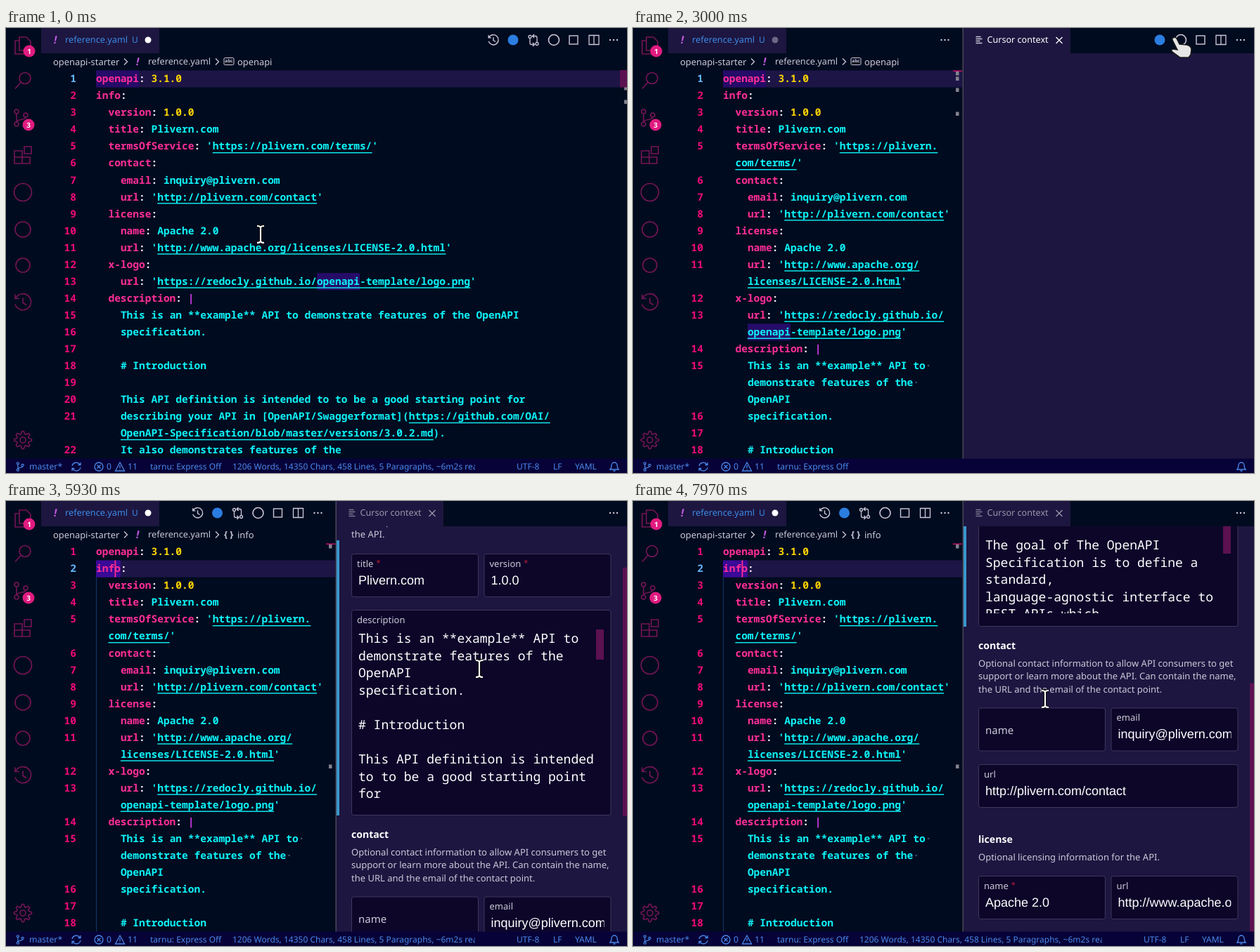
These frames come from a looping animation (883x634 px, 8 s). An HTML page:

```html
<!DOCTYPE html>
<html lang="en">
<head>
<meta charset="utf-8">
<title>Editor with cursor context</title>
<style>
html, body { margin: 0; width: 100%; height: 100%; overflow: hidden; background: #010b1f; }
svg { position: fixed; inset: 0; width: 100%; height: 100%; }
text { white-space: pre; text-rendering: geometricPrecision; font-family: "Noto Sans", "Open Sans", sans-serif; }
.code { font: bold 14.54px "Noto Sans Mono", "DejaVu Sans Mono", monospace; }
.area { font: 18px "Noto Sans Mono", "DejaVu Sans Mono", monospace; }
.arial { font-family: "Liberation Sans", Arial, sans-serif; }
.num { fill: #ee0a78; text-anchor: end; }
.num.on { fill: #62b4fb; }
.key { fill: #ff2e97; }
.punc { fill: #f4eef8; }
.str { fill: #0ef3f8; }
.val { fill: #ffd400; }
.pipe { fill: #d43df0; }
.word { fill: var(--word); }
</style>
</head>
<body>
<svg id="stage" viewBox="0 0 883 634" xmlns="http://www.w3.org/2000/svg"></svg>
<script>
(() => {
const LOOP = 8000, X = 128, CW = 8.725, LH = 24.05;
const NAVY = '#010b1f', PANEL = '#1d1640', FIELD = '#0d0629', EDGE = '#3d375c';
const CYAN = '#0ef3f8', SOFT = '#cbc8d8', DIM = '#751557', SLIDER = '#5c1150', BLUE = '#4b88ea';

// Drawing helpers; text is placed by its visual middle.
const rect = (x, y, w, h, fill, more = '') =>
  `<rect x="${x}" y="${y}" width="${w}" height="${h}" fill="${fill}" ${more}/>`;
const text = (x, mid, s, size = 13, fill = SOFT, more = '') =>
  `<text x="${x}" y="${mid + size * 0.35}" font-size="${size}" fill="${fill}" ${more}>${s}</text>`;
const group = (id, body, more = '') => `<g id="${id}" ${more}>${body}</g>`;
const disc = (x, y, r, fill) => `<circle cx="${x}" cy="${y}" r="${r}" fill="${fill}"/>`;
const ring = (x, y, r, color, w = 1.6) =>
  `<circle cx="${x}" cy="${y}" r="${r}" fill="none" stroke="${color}" stroke-width="${w}"/>`;
const dot = (x, y, r) => `M${x - r} ${y}a${r} ${r} 0 1 0 ${2 * r} 0a${r} ${r} 0 1 0 ${-2 * r} 0`;
const bold = 'font-weight="700"';

function gear() {
  let d = '';
  for (let i = 0; i < 32; i++) {
    const a = (i - 0.5) * Math.PI / 16, r = i % 4 < 2 ? 12.5 : 9;
    d += (i ? 'L' : 'M') + (r * Math.cos(a)).toFixed(2) + ' ' + (r * Math.sin(a)).toFixed(2);
  }
  return d + 'Z' + dot(0, 0, 4);
}

const shapes = {
  files: 'M-5 -12H5L11 -6V7H-5ZM-5 -7H-11V12H5V7',
  search: dot(3, -4, 8) + 'M-3 2L-11 11',
  scm: dot(-6, -9, 3) + dot(-6, 9, 3) + dot(7, -4, 3) + 'M-6 -6V6M7 -1C7 4 -6 1 -6 6',
  extensions: 'M-12 -6H-1V12H-12ZM-12 3H10V12H-1M2 -12H12V-2H2Z',
  history: 'M-10 -6A11.5 11.5 0 1 1 -11 3M-11 -11V-5H-5M0 -6V1L5 4',
  gear: gear(),
  compare: dot(-5, -5, 2) + dot(5, 5, 2) +
    'M-5 -3V4Q-5 6 -3 6H1M-1 3.5L1.5 6L-1 8.5M5 3V-4Q5 -6 3 -6H-1M1 -8.5L-1.5 -6L1 -3.5',
  split: 'M-7 -6.5H7V6.5H-7ZM0 -6.5V6.5',
  lines: 'M-4.5 -4.5H2.5M-4.5 -1.5H4.5M-4.5 1.5H1.5M-4.5 4.5H4.5',
  close: 'M-4.5 -4.5L4.5 4.5M4.5 -4.5L-4.5 4.5',
  chevron: 'M-2 -4.5L2.5 0L-2 4.5',
  sync: 'M-6 -1A6 6 0 0 1 5 -3M6 1A6 6 0 0 1 -5 3M6 -6V-2.5H2.5M-6 6V2.5H-2.5',
  error: dot(0, 0, 6) + 'M-2.5 -2.5L2.5 2.5M2.5 -2.5L-2.5 2.5',
  warning: 'M0 -6L6.5 6H-6.5ZM0 -2V2M0 3.5V4.5',
  bell: 'M-6 4Q-4 2 -4 -2A4 4 0 0 1 4 -2Q4 2 6 4ZM-1.5 6H1.5'
};
const icon = (name, x, y, color = SOFT, scale = 1, w = 1.3) =>
  `<path d="${shapes[name]}" transform="translate(${x} ${y}) scale(${scale})" fill="none" stroke="${color}" stroke-width="${w / scale}"/>`;
const dots = (x, y) => [-5, 0, 5].map(d => disc(x + d, y, 1.2, SOFT)).join('');

// Editor text: [line number, column, source]; braces enclose a link.
const head = [
  [1, 0, 'openapi: 3.1.0'], [2, 0, 'info:'], [3, 2, 'version: 1.0.0'], [4, 2, 'title: Plivern.com']];
const middle = [
  [6, 2, 'contact:'], [7, 4, 'email: inquiry@plivern.com'],
  [8, 4, "url: '{http://plivern.com/contact}'"], [9, 2, 'license:'], [10, 4, 'name: Apache 2.0']];
const wide = [...head,
  [5, 2, "termsOfService: '{https://plivern.com/terms/}'"], ...middle,
  [11, 4, "url: '{http://www.apache.org/licenses/LICENSE-2.0.html}'"],
  [12, 2, 'x-logo:'], [13, 4, "url: '{https://redocly.github.io/openapi-template/logo.png}'"],
  [14, 2, 'description: |'],
  [15, 4, 'This is an **example** API to demonstrate features of the OpenAPI'],
  [16, 4, 'specification.'], [17, 4, ''], [18, 4, '# Introduction'], [19, 4, ''],
  [20, 4, 'This API definition is intended to to be a good starting point for'],
  [21, 4, 'describing your API in [OpenAPI/Swaggerformat]({https://github.com/OAI/}'],
  ['', 4, '{OpenAPI-Specification/blob/master/versions/3.0.2.md}).'],
  [22, 4, 'It also demonstrates features of the']];
const narrow = [...head,
  [5, 2, "termsOfService: '{https://plivern.}"], ['', 2, "{com/terms/}'"], ...middle,
  [11, 4, "url: '{http://www.apache.org/}"], ['', 4, "{licenses/LICENSE-2.0.html}'"],
  [12, 2, 'x-logo:'], [13, 4, "url: '{https://redocly.github.io/}"],
  ['', 4, "{openapi-template/logo.png}'"], [14, 2, 'description: |'],
  [15, 4, 'This is an **example** API to·'], ['', 4, 'demonstrate features of the·'], ['', 4, 'OpenAPI'],
  [16, 4, 'specification.'], [17, 4, ''], [18, 4, '# Introduction']];

const span = (cls, s) => `<tspan class="${cls}">${s}</tspan>`;
function paint(s) {
  const m = s.match(/^([\w-]+):(.*)$/);
  if (!m) return span('str', s.replace('·', '<tspan fill="#35506c">·</tspan>'));
  const kind = m[2] === ' |' ? 'pipe' : /^ \d/.test(m[2]) ? 'val' : 'str';
  return span('key', m[1]) + span('punc', ':') + span(kind, m[2]);
}
function editor(rows, id) {
  return rows.map(([num, col, src], i) => {
    const y = 77.2 + i * LH, open = src.indexOf('{'), close = src.indexOf('}');
    const line = open < 0 ? '' :
      rect(X + (col + open) * CW, y + 3.6, (close - open - 1) * CW, 1.4, CYAN);
    return `<text id="${id}${num || 'w' + i}" class="code num" x="100" y="${y}">${num}</text>` + line +
      `<text class="code" x="${X + col * CW}" y="${y}">${paint(src.replace(/[{}]/g, ''))}</text>`;
  }).join('');
}
const word = (row, col, n) => rect(X + col * CW, 60.5 + row * LH, n * CW, LH, 'none', 'class="word"');
const marks = (x, ys) => ys.map(y => rect(x, y, 4.5, 5.5, '#83828f')).join('');

// Panel pieces.
const inline = s => s.replace(/\*\*(.+?)\*\*/g, `<tspan ${bold} fill="#fff">$1</tspan>`)
  .replace(/\*(.+?)\*/g, '<tspan font-style="italic">$1</tspan>');
const para = (y, ...rows) => rows.map((s, i) => text(491, y + i * 18.25, inline(s))).join('');
const title = (y, s, size = 14.1) => text(491, y, s, size, '#fff', bold);
const box = (x, y, w, h) => rect(x + .5, y + .5, w, h, FIELD, `rx="3" stroke="${EDGE}"`);
const button = (y, w, s) => box(491, y, w, 40) + text(514, y + 20, s, 14.6, '#fff', `class="arial" ${bold}`);
function field(x, y, label, value, star = false, w = 180) {
  const mark = star ? '<tspan dx="4" dy="-2" fill="#c01b35" font-size="11">*</tspan>' : '';
  return box(x, y, w, 61) + (value
    ? text(x + 8, y + 14, label + mark) + text(x + 10, y + 37.5, value, 18, '#fff', 'class="arial" clip-path="url(#cut)"')
    : text(x + 10, y + 32, label, 15));
}
const prose = `This is an **example** API to
demonstrate features of the
OpenAPI
specification.

# Introduction

This API definition is intended
to to be a good starting point
for
describing your API in
[OpenAPI/Swaggerformat]
(https://github.com/OAI/OpenAPI
-Specification/blob/master/vers
ions/3.0.2.md).
It also demonstrates features
of the
[create-openapi-repo]
(https://github.com/Redocly/cre
ate-openapi-repo) tool and
[Redoc]
(https://github.com/Redocly/Red
oc) documentation engine.
Beyond the standard
OpenAPI syntax, there are a few
[vendor
extensions]
(https://github.com/Redocly/Red
oc/blob/master/docs/redoc-
vendor-extensions.md).

# OpenAPI Specification

The goal of The OpenAPI
Specification is to define a
standard,
language-agnostic interface to
REST APIs which`.split('\n');

const infoText = ['This object is required at the top level of the document. It is',
  'used to provide metadata and additional information about', 'the API.'];
const rootPanel = title(67, 'openapi', 18.1) +
  para(107, 'This is the root object of the OpenAPI document. At the very',
    'minimum, it requires *openapi*, *info*, and *paths*. All other top-',
    'level fields/objects are optional. **OAS 3.1** requires at least',
    'one of the following at the top level: *paths*, *components*,', '*webhooks*.') +
  title(217, 'info') + para(243, ...infoText) + button(306, 114, 'Go to info') +
  title(375, 'servers') +
  para(399, 'An array of Server Objects. If the *servers* property is not',
    "provided or if it's an empty array, the default value would be", 'a Server Object with a *url* value of */*.') +
  button(463, 139, 'Go to servers') + title(531, 'paths') +
  para(556, 'A container for relative paths to the individual endpoints',
    'and their operations. The path is appended to the URL from',
    'the Server Object in order to construct the full URL. Path',
    'templating is allowed. When matching URLs, concrete (non-') +
  rect(877, 36, 6, 156, SLIDER);
const infoPanel = rect(470, 152, 4, 392, '#3a97cc') + title(67, 'info', 18.1) + para(107, ...infoText) +
  field(491, 171, 'title', 'Plivern.com', true) + field(679.5, 171, 'version', '1.0.0', true) +
  box(491, 251, 368.5, 292) + text(499, 265, 'description') +
  group('areaBox', group('areaText', prose.map((s, i) =>
    `<text class="area" x="501" y="${298.4 + i * 24.52}" fill="#fff">${s}</text>`).join('')), 'clip-path="url(#area)"') +
  rect(839, 279, 11, 43, SLIDER, 'id="areaSlider"') +
  title(571, 'contact') +
  para(596.5, 'Optional contact information to allow API consumers to get',
    'support or learn more about the API. Can contain the name,', 'the URL and the email of the contact point.') +
  field(491, 659.5, 'name') + field(679.5, 659.5, 'email', 'inquiry@plivern.com') +
  field(491, 740, 'url', 'http://plivern.com/contact', false, 368.5) +
  title(847, 'license') + para(872, 'Optional licensing information for the API.') +
  field(491, 899, 'name', 'Apache 2.0', true) +
  field(679.5, 899, 'url', 'http://www.apache.org/licenses/LICENSE-2.0.html');

// Frame around the editor.
const plainSquare = rect(801, 11, 12, 12, 'none', `stroke="${SOFT}" stroke-width="1.4"`);
const commonTools = ring(779, 17, 7.5, SOFT) + plainSquare + icon('split', 836, 17);
const tools = icon('history', 693, 17, SOFT, .62, 1.4) + disc(721, 17, 7.5, '#2b7de0') +
  icon('compare', 750, 17.5) + commonTools + dots(864, 17);
const panelTools = disc(749, 17, 7.5, '#2b7de0') + commonTools;
const badge = (x, y, s) => disc(x, y, 8.5, '#e01b80') + text(x, y, s, 10, '#fff', `${bold} text-anchor="middle"`);
const activity = icon('files', 24, 25, DIM, 1, 1.6) + badge(33, 33, 1) + icon('search', 24, 75.5, DIM, 1, 1.6) +
  icon('scm', 21, 128, DIM, 1, 1.6) + badge(32, 138, 3) + icon('extensions', 24, 181, DIM, 1, 1.6) +
  ring(24, 234, 12.5, DIM) + ring(24, 287, 11, DIM) + ring(24, 338, 10, DIM) +
  icon('history', 24, 390.5, DIM, 1, 1.6) + icon('gear', 24, 587, DIM, 1, 1.6);
const bang = (x, y) => text(x, y, '!', 15, '#c25be0', `${bold} font-style="italic"`);
const fileTab = rect(50, 0, 168, 36, PANEL) + bang(68, 17) + text(84, 17, 'reference.yaml', 12.7, '#3c8be6') +
  text(179, 17, 'U', 12, '#3c8be6') + '<circle id="dirty" cx="202" cy="17" r="4.5"/>';
const crumbs = text(67, 48, 'openapi-starter', 12.9) + icon('chevron', 170, 48) + bang(185, 48) +
  text(202, 48, 'reference.yaml', 12.7) + icon('chevron', 300, 48) +
  group('crumbRoot', rect(310, 42.5, 14, 10, 'none', `rx="1.5" stroke="${SOFT}"`) +
    text(317, 47.2, 'abc', 6.5, SOFT, `${bold} text-anchor="middle"`) + text(329, 48, 'openapi', 12.9)) +
  group('crumbInfo', text(310, 48, '{ }', 12.5, SOFT, bold) + text(329, 48, 'info', 12.9));
const statusBar = rect(0, 613.5, 883, 20.5, '#070338') + icon('scm', 20, 625, BLUE, .52, 1.2) +
  text(33, 625, 'master*', 12.2, BLUE) + icon('sync', 100, 625, BLUE) + icon('error', 132, 625, BLUE) +
  text(143, 625, '0', 12.2, BLUE) + icon('warning', 162, 625, BLUE) + text(173, 625, '11', 12.2, BLUE) +
  text(205, 625, 'tarnu: Express Off', 12, BLUE) + icon('bell', 865, 625, BLUE) +
  group('fileStatus', text(322, 625, '1206 Words, 14350 Chars, 458 Lines, 5 Paragraphs, ~6m2s read', 12, BLUE,
    'clip-path="url(#stat)"') + text(726, 625, 'UTF-8', 12, BLUE) + text(778, 625, 'LF', 12, BLUE) +
    text(809, 625, 'YAML', 12, BLUE));

const beam = 'M-5 -12Q-1 -12 0 -10Q1 -12 5 -12M0 -10V10M-5 12Q-1 12 0 10Q1 12 5 12';
const hand = 'M-10 -13q3 -2 5 1l4 8l10 1q6 1 7 6l-1 8l-3 4h-12l-11 -8q-3 -3 1 -4l6 1l-7 -14q-1 -2 1 -3z';
const clip = (id, x, y, w, h) => `<clipPath id="${id}">${rect(x, y, w, h, '#000')}</clipPath>`;

document.getElementById('stage').innerHTML =
  '<defs>' + clip('cut', 491, 0, 359.5, 1100) + clip('area', 492, 279, 347, 246) +
  clip('view', 470, 36, 413, 578) + clip('stat', 322, 614, 345, 20) + '</defs>' +
  rect(0, 0, 883, 634, NAVY) + activity + fileTab + crumbs +
  rect(X, 60.5, 755, LH, '#1d1546', 'id="current"') +
  group('wide', word(0, 0, 7) + word(12, 36, 7) + editor(wide, 'a') + marks(879, [62, 70, 83, 102.5]) +
    rect(873, 60.5, 10, 1.5, '#c0126c')) +
  group('narrow', group('rootWords', word(0, 0, 7) + word(15, 4, 7) + marks(459, [62, 69.5, 85.5, 119.5])) +
    group('infoWords', word(1, 0, 4) + rect(X, 60.5 + 2 * LH, 1, 506, '#123a68') + marks(459, [62, 375.5])) +
    editor(narrow, 'b') + rect(455, 60.5, 13, 1.5, '#c0126c') +
    rect(470, 0, 152, 37, PANEL) + rect(470, 36, 413, 578, PANEL) +
    group('panelTab', icon('lines', 492, 17) + text(503.5, 17, 'Cursor context', 12.6, '#fff') +
      icon('close', 606, 17.5, '#fff')) +
    dots(864, 17) + group('panelTools', panelTools + dots(443.5, 17)) +
    group('view0', group('root', rootPanel) + group('info', infoPanel) +
      rect(877, 36, 6, 354, SLIDER, 'id="pageSlider"'), 'clip-path="url(#view)"') +
    rect(468.5, 0, 1.5, 614, '#4a4858')) +
  group('tools', tools) + rect(0, 60.5, 10, 24, SLIDER, 'id="slider"') +
  rect(154.5, 60.5, 1.8, LH, '#ff2e88', 'id="caret"') + statusBar +
  group('tip', rect(783.5, 28.5, 99, 26, FIELD, `stroke="${EDGE}"`) + text(790, 41.5, 'Cursor context', 12.6)) +
  group('mouse', group('beam', `<path d="${beam}" fill="none" stroke="#111" stroke-width="4.5"/>` +
    `<path d="${beam}" fill="none" stroke="#fff" stroke-width="2"/>`) +
    `<path id="hand" d="${hand}" fill="#e6e6e6" stroke="#1a1a1a" stroke-width="1.5"/>`);

const el = {};
document.querySelectorAll('[id]').forEach(e => el[e.id] = e);
const show = (id, on) => el[id].style.display = on ? '' : 'none';
const move = (id, x, y) => el[id].setAttribute('transform', `translate(${x} ${y})`);

// Linear value between [time, ...values] stops.
function track(stops, t) {
  let i = stops.length - 1;
  while (i > 0 && stops[i][0] > t) i--;
  const a = stops[i], b = stops[i + 1] || a;
  const k = b === a ? 0 : Math.min(1, Math.max(0, (t - a[0]) / (b[0] - a[0])));
  return a.slice(1).map((v, n) => v + (b[n + 1] - v) * k);
}
const pointer = [
  [0, 362, 294], [730, 362, 294], [830, 513, 193], [1530, 513, 193], [1870, 778, 27], [3630, 778, 27],
  [3970, 187, 66], [4170, 176, 80], [4369, 176, 80], [4370, 154, 95], [4870, 154, 95], [5200, 612, 175],
  [5670, 654, 237], [5929, 654, 237], [5930, 673, 239], [6470, 673, 239], [7170, 728, 418],
  [7300, 728, 418], [7500, 640, 478], [7970, 586, 282]];
const pageStops = [[0, 0], [5929, 0], [5930, 96], [7530, 96], [7940, 365]];
const areaStops = [[0, 0], [6500, 0], [7130, 673.5]];
const fadeStops = [[0, 1], [1600, 1], [1870, 0], [4629, 0], [4630, 1], [5500, 1], [5730, 0]];

function update(t) {
  const split = t >= 2770, info = t >= 4630, panelInfo = t >= 4700;
  const away = split && !info, focused = t >= 2500 && !away;

  show('wide', !split);
  show('narrow', split);
  show('tools', !away);
  move('tools', split ? -420.5 : 0, 0);
  show('panelTools', away);
  el.panelTab.style.opacity = info ? .55 : 1;
  show('fileStatus', !away);
  el.dirty.setAttribute('fill', away ? '#6b6785' : '#fff');
  show('crumbRoot', !info);
  show('crumbInfo', info);

  el.stage.style.setProperty('--word', focused ? '#3a0a98' : '#260b68');
  show('rootWords', !info);
  show('infoWords', info);
  el.current.setAttribute('y', 60.5 + (info ? LH : 0));
  el.current.setAttribute('width', split ? 340 : 755);
  el.a1.classList.add('on');
  el.b1.classList.toggle('on', !info);
  el.b2.classList.toggle('on', info);

  const blink = info ? (t < 4650 || (t - 4650) % 1000 < 500) : focused;
  show('caret', blink);
  el.caret.setAttribute('y', 60.5 + (info ? LH : 0));
  el.slider.setAttribute('x', split ? 454 : 873);
  el.slider.setAttribute('width', split ? 14 : 10);
  el.slider.style.opacity = track(fadeStops, t)[0];

  const [page] = track(pageStops, t), [area] = track(areaStops, t);
  show('root', t >= 3200 && !panelInfo);
  show('info', panelInfo);
  show('pageSlider', panelInfo);
  move('info', 0, -page);
  move('pageSlider', 0, page * 0.6125);
  move('areaText', 0, -area);
  move('areaSlider', 0, area * 0.1752);

  const [x, y] = track(pointer, t);
  move('mouse', x, y);
  show('hand', y < 37);
  show('beam', y >= 37);
  show('tip', t >= 2130 && t < 2500);
}

function tick(now) {
  update(now % LOOP);
  requestAnimationFrame(tick);
}
update(0);
requestAnimationFrame(tick);
})();
</script>
</body>
</html>
```
